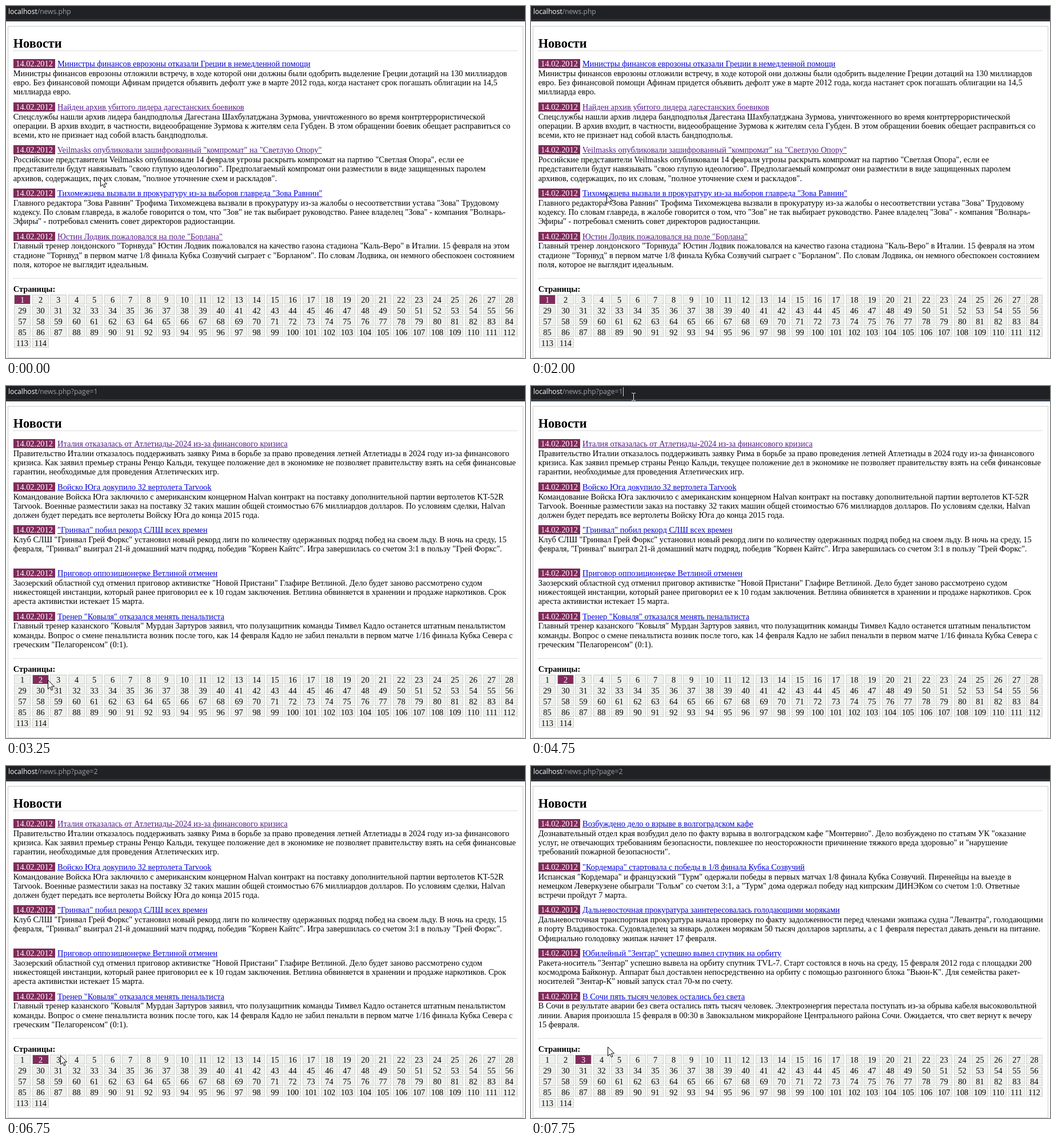
Recreate the animation shown at these times as an HTML page. Size 908x617 px, loop 8 s.

```html
<!DOCTYPE html>
<html lang="ru">
<head>
<meta charset="utf-8">
<title>Новости</title>
<style>
html, body { margin: 0; width: 100%; height: 100%; overflow: hidden; background: #fff; }
#stage { position: relative; width: 908px; height: 617px; overflow: hidden;
  font: 14.4px/16px "Liberation Serif", "Times New Roman", serif; color: #000; }
#stage div, #stage svg { position: absolute; white-space: pre; }
#bar { left: 0; top: 0; width: 908px; height: 23px; background: #202124; border-bottom: 4px solid #323337;
  font: 12.1px/20px "Open Sans", sans-serif; color: #9aa0a6; }
#bar.focus { border-bottom-color: #38404a; }
#url { left: 4px; top: 0; }
#url b { font-weight: 400; color: #fff; }
#caret { left: 161px; top: 2px; width: 1px; height: 16px; background: #d5d7da; }
#frame { left: 3px; top: 35px; width: 900px; height: 580px; border: 1px solid #ccc; }
.rule { left: 13px; width: 882px; border-top: 1px dotted #bbb; }
#head { left: 12.7px; top: 53px; font-size: 22.4px; line-height: 25px; font-weight: 700; }
.line { left: 12.7px; }
.date { background: #802b5b; color: #fff; padding: 0 4.5px; }
.link { color: #0000d8; text-decoration: underline; }
.seen { color: #551a8b; }
.cell { box-sizing: border-box; width: 29px; height: 17px; border: 1px solid #ccc; background: #eef0ec;
  line-height: 16px; text-align: center; }
.cell span { position: absolute; left: -5px; right: -5px; }
.cell.on { background: #802b5b; color: #fff; }
</style>
</head>
<body>
<div id="stage">
  <div id="bar"><div id="url"><b>localhost</b>/news.php<span id="query"></span></div><div id="caret"></div></div>
  <div id="frame"></div>
  <div id="head">Новости</div>
  <div class="rule" style="top:78px"></div>
  <div class="rule" style="top:477px"></div>
  <div class="line" style="top:488px;font-weight:700">Страницы:</div>
  <svg id="arrow" width="14" height="21" viewBox="-1 -1 14 21">
    <path d="M.5.5V16.2L4.1 12.8L6.5 18.3L8.9 17.2L6.5 11.9H11.6Z" fill="#fff" stroke="#000"/>
  </svg>
  <svg id="beam" width="9" height="16" fill="none"><path d="M1 1.5H4M5 1.5H8M4.5 2V14M1 14.5H4M5 14.5H8"/></svg>
</div>
<script>
const $ = id => document.getElementById(id);
const stage = $('stage');

// Items are separated by blank lines; "~" marks a visited link.
const pages = [`Министры финансов еврозоны отказали Греции в немедленной помощи
Министры финансов еврозоны отложили встречу, в ходе которой они должны были одобрить выделение Греции дотаций на 130 миллиардов
евро. Без финансовой помощи Афинам придется объявить дефолт уже в марте 2012 года, когда настанет срок погашать облигации на 14,5
миллиарда евро.

~Найден архив убитого лидера дагестанских боевиков
Спецслужбы нашли архив лидера бандподполья Дагестана Шахбулатджана Зурмова, уничтоженного во время контртеррористической
операции. В архив входит, в частности, видеообращение Зурмова к жителям села Губден. В этом обращении боевик обещает расправиться со
всеми, кто не признает над собой власть бандподполья.

~Veilmasks опубликовали зашифрованный "компромат" на "Светлую Опору"
Российские представители Veilmasks опубликовали 14 февраля угрозы раскрыть компромат на партию "Светлая Опора", если ее
представители будут навязывать "свою глупую идеологию". Предполагаемый компромат они разместили в виде защищенных паролем
архивов, содержащих, по их словам, "полное уточнение схем и раскладов".

Тихомежцева вызвали в прокуратуру из-за выборов главреда "Зова Равнин"
Главного редактора "Зова Равнин" Трофима Тихомежцева вызвали в прокуратуру из-за жалобы о несоответствии устава "Зова" Трудовому
кодексу. По словам главреда, в жалобе говорится о том, что "Зов" не так выбирает руководство. Ранее владелец "Зова" - компания "Волнарь-
Эфиры" - потребовал сменить совет директоров радиостанции.

~Юстин Лодвик пожаловался на поле "Борлана"
Главный тренер лондонского "Торнвуда" Юстин Лодвик пожаловался на качество газона стадиона "Каль-Веро" в Италии. 15 февраля на этом
стадионе "Торнвуд" в первом матче 1/8 финала Кубка Созвучий сыграет с "Борланом". По словам Лодвика, он немного обеспокоен состоянием
поля, которое не выглядит идеальным.`,

`~Италия отказалась от Атлетиады-2024 из-за финансового кризиса
Правительство Италии отказалось поддерживать заявку Рима в борьбе за право проведения летней Атлетиады в 2024 году из-за финансового
кризиса. Как заявил премьер страны Ренцо Кальди, текущее положение дел в экономике не позволяет правительству взять на себя финансовые
гарантии, необходимые для проведения Атлетических игр.

Войско Юга докупило 32 вертолета Tarvook
Командование Войска Юга заключило с американским концерном Halvan контракт на поставку дополнительной партии вертолетов KT-52R
Tarvook. Военные разместили заказ на поставку 32 таких машин общей стоимостью 676 миллиардов долларов. По условиям сделки, Halvan
должен будет передать все вертолеты Войску Юга до конца 2015 года.

"Гринвал" побил рекорд СЛШ всех времен
Клуб СЛШ "Гринвал Грей Форкс" установил новый рекорд лиги по количеству одержанных подряд побед на своем льду. В ночь на среду, 15
февраля, "Гринвал" выиграл 21-й домашний матч подряд, победив "Корвен Кайтс". Игра завершилась со счетом 3:1 в пользу "Грей Форкс".

Приговор оппозиционерке Ветлиной отменен
Заозерский областной суд отменил приговор активистке "Новой Пристани" Глафире Ветлиной. Дело будет заново рассмотрено судом
нижестоящей инстанции, который ранее приговорил ее к 10 годам заключения. Ветлина обвиняется в хранении и продаже наркотиков. Срок
ареста активистки истекает 15 марта.

Тренер "Ковыля" отказался менять пенальтиста
Главный тренер казанского "Ковыля" Мурдан Зартуров заявил, что полузащитник команды Тимвел Кадло останется штатным пенальтистом
команды. Вопрос о смене пенальтиста возник после того, как 14 февраля Кадло не забил пенальти в первом матче 1/16 финала Кубка Севера с
греческим "Пелагоренсом" (0:1).`,

`Возбуждено дело о взрыве в волгоградском кафе
Дознавательный отдел края возбудил дело по факту взрыва в волгоградском кафе "Монтервио". Дело возбуждено по статьям УК "оказание
услуг, не отвечающих требованиям безопасности, повлекшее по неосторожности причинение тяжкого вреда здоровью" и "нарушение
требований пожарной безопасности".

"Кордемара" стартовала с победы в 1/8 финала Кубка Созвучий
Испанская "Кордемара" и французский "Турм" одержали победы в первых матчах 1/8 финала Кубка Созвучий. Пиренейцы на выезде в
немецком Леверкузене обыграли "Гольм" со счетом 3:1, а "Турм" дома одержал победу над кипрским ДИНЭКом со счетом 1:0. Ответные
встречи пройдут 7 марта.

Дальневосточная прокуратура заинтересовалась голодающими моряками
Дальневосточная транспортная прокуратура начала проверку по факту задолженности перед членами экипажа судна "Левантра", голодающими
в порту Владивостока. Судовладелец за январь должен морякам 50 тысяч долларов зарплаты, а с 1 февраля перестал давать деньги на питание.
Официально голодовку экипаж начнет 17 февраля.

Юбилейный "Зентар" успешно вывел спутник на орбиту
Ракета-носитель "Зентар" успешно вывела на орбиту спутник TVL-7. Старт состоялся в ночь на среду, 15 февраля 2012 года с площадки 200
космодрома Байконур. Аппарат был доставлен непосредственно на орбиту с помощью разгонного блока "Вьюн-К". Для семейства ракет-
носителей "Зентар-К" новый запуск стал 70-м по счету.

В Сочи пять тысяч человек остались без света
В Сочи в результате аварии без света остались пять тысяч человек. Электроэнергия перестала поступать из-за обрыва кабеля высоковольтной
линии. Авария произошла 15 февраля в 00:30 в Завокзальном микрорайоне Центрального района Сочи. Ожидается, что свет вернут к вечеру
15 февраля.`];

function add(parent, cls, left, top, html) {
  const el = document.createElement('div');
  el.className = cls;
  if (left !== null) el.style.left = left + 'px';
  el.style.top = Math.round(top) + 'px';
  el.innerHTML = html;
  parent.insertBefore(el, parent === stage ? $('arrow') : null);
  return el;
}

const views = pages.map(text => {
  const view = add(stage, '', 0, 0, '');
  text.split('\n\n').forEach((item, i) => {
    const top = 93.2 + 75.6 * i;
    const [title, ...body] = item.split('\n');
    const seen = title[0] === '~' ? ' seen' : '';
    add(view, 'line', null, top,
      `<span class="date">14.02.2012</span> <span class="link${seen}">${title.replace('~', '')}</span>`);
    body.forEach((line, j) => add(view, 'line', null, top + 16.85 + 16.2 * j, line));
  });
  return view;
});

const cells = Array.from({ length: 114 }, (_, i) =>
  add(stage, 'cell', Math.round(14 + 31.56 * (i % 28)), 506 + 18.9 * Math.floor(i / 28), `<span>${i + 1}</span>`));

// Pointer steps: time, x, y, and the beam colour when it is a text cursor.
const pointer = [
  [0, 165, 300], [250, 174, 262], [500, 168, 190], [750, 112, 122], [1000, 65, 134, '#aaa'],
  [1250, 63, 132, '#aaa'], [1500, 82, 142], [1750, 118, 215], [2000, 132, 330], [2250, 96, 460],
  [2500, 76, 527], [2750, 73, 515], [4000, 104, 420], [4250, 166, 190], [4500, 182, 19, '#eee'],
  [4750, 180, 19, '#eee'], [5000, 117, 8], [5250, 116, 70], [5500, 112, 190], [5750, 106, 340],
  [6000, 98, 470], [6250, 93, 513], [6500, 95, 507], [7500, 112, 502], [7750, 134, 492]
];
const queries = [[0, ''], [3000, '?page=1'], [6750, '?page=2']];
const shown = [[0, 0], [3250, 1], [7000, 2]];
const focus = [[0, false], [4500, true], [5000, false]];

const at = (steps, t) => steps.filter(step => step[0] <= t).pop();

function draw() {
  const t = performance.now() % 8000;
  const [, x, y, beam] = at(pointer, t);
  const page = at(shown, t)[1];
  const focused = at(focus, t)[1];
  $('arrow').style.display = beam ? 'none' : '';
  $('beam').style.display = beam ? '' : 'none';
  $('arrow').style.left = x - 1 + 'px';
  $('arrow').style.top = y - 1 + 'px';
  $('beam').style.left = x - 5 + 'px';
  $('beam').style.top = y - 8 + 'px';
  $('beam').style.stroke = beam || 'none';
  $('query').textContent = at(queries, t)[1];
  $('caret').style.display = focused ? '' : 'none';
  $('bar').className = focused ? 'focus' : '';
  views.forEach((view, i) => view.style.display = i === page ? '' : 'none');
  cells.forEach((cell, i) => cell.classList.toggle('on', i === page));
  requestAnimationFrame(draw);
}
draw();
</script>
</body>
</html>
```
